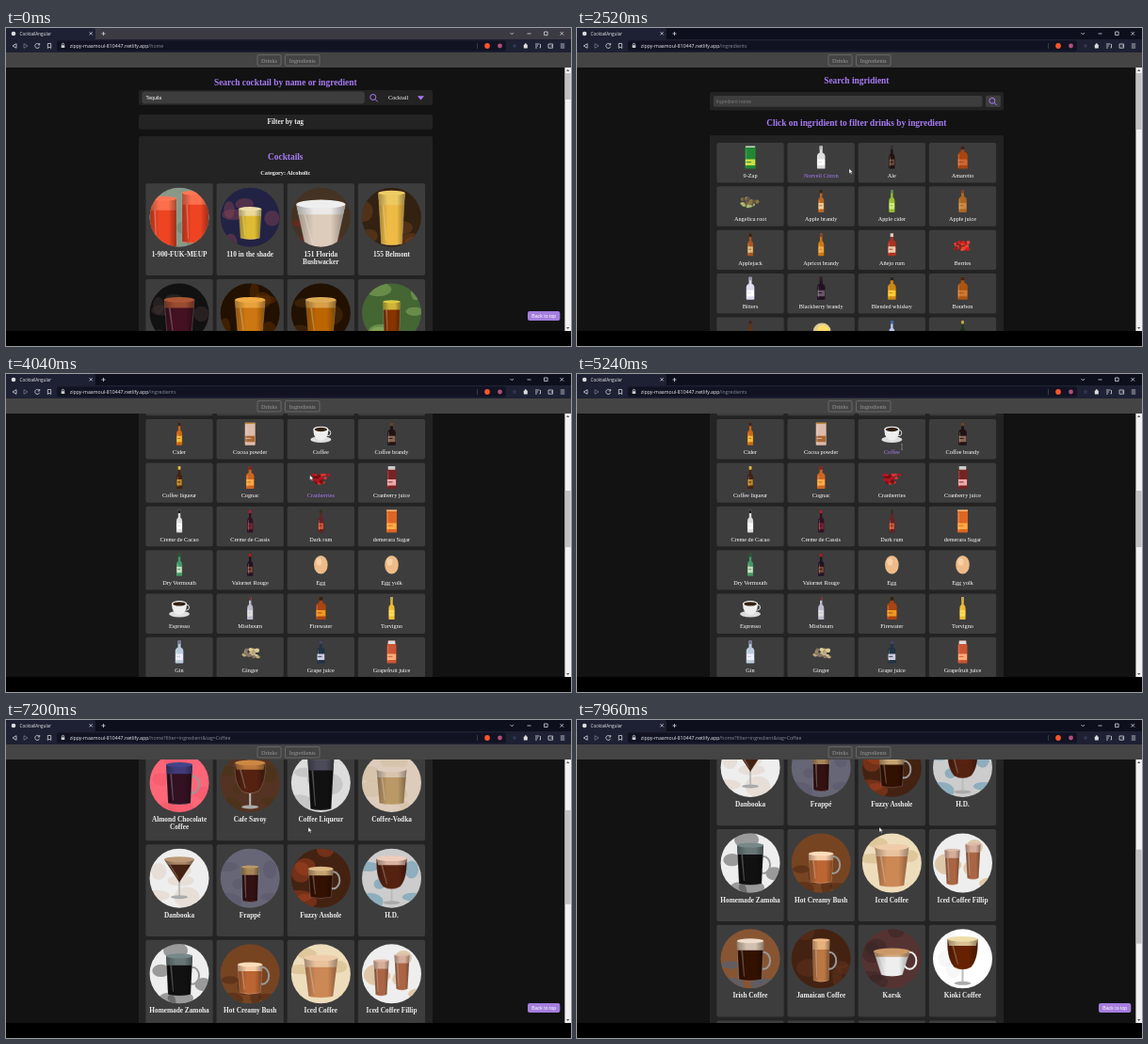
An HTML page that plays this animation: 600x338 px, repeating every 8000 ms.

```html
<!DOCTYPE html>
<html lang="en">
<head>
<meta charset="utf-8">
<title>CocktailAngular</title>
<style>
html, body { margin: 0; width: 100%; height: 100%; overflow: hidden; background: #000; }
svg { display: block; width: 600px; height: 338px; }
text { font-family: "Liberation Serif", serif; text-anchor: middle; white-space: pre; }
.bold { font-weight: bold; }
.left { text-anchor: start; }
.form { font-family: "Liberation Sans", sans-serif; }
.ui { font-family: "Open Sans", sans-serif; text-anchor: start; }
.line { fill: none; stroke: #d5d6dd; stroke-width: .8; }
.hover { fill: #a97bf5; }
</style>
</head>
<body>
<svg viewBox="0 0 600 338">
  <defs>
    <clipPath id="disc"><circle r="31.5"/></clipPath>
    <linearGradient id="round">
      <stop offset="0" stop-opacity=".3"/><stop offset=".35" stop-opacity="0"/>
      <stop offset=".7" stop-opacity="0"/><stop offset="1" stop-opacity=".35"/>
    </linearGradient>
  </defs>
  <rect width="600" height="338" fill="#121212"/>
  <g id="pages"></g>
  <g id="frame"></g>
  <g id="arrow"><path d="M0 0V5.2L1.3 4.1 2.2 6 3 5.6 2.2 3.8H3.8Z" fill="#fff" stroke="#222" stroke-width=".3"/></g>
  <g id="beam"><path d="M-1-2.8H1M0-2.8V2.8M-1 2.8H1" fill="none" stroke="#999" stroke-width=".6"/></g>
</svg>
<script>
const $ = id => document.getElementById(id);
const PURPLE = '#a97bf5', BOX = '#232323', CARD = '#3d3d3d';
const LOOP = 8000, PITCH_X = 75.15, DRINK_H = 101.7, ITEM_H = 46.35;

const rect = (x, y, w, h, fill, r = 0, more = '') =>
  `<rect x="${x}" y="${y}" width="${w}" height="${h}" rx="${r}" fill="${fill}" ${more}/>`;
const oval = (x, y, rx, ry, fill, more = '') =>
  `<ellipse cx="${x}" cy="${y}" rx="${rx}" ry="${ry}" fill="${fill}" ${more}/>`;
const path = (d, fill, more = '') => `<path d="${d}" fill="${fill}" ${more}/>`;
const line = d => `<path class="line" d="${d}"/>`;
const text = (x, y, s, size, fill = '#eee', cls = '') =>
  `<text x="${x}" y="${y}" font-size="${size}" fill="${fill}" class="${cls}">${s}</text>`;
const group = (x, y, body, more = '') => `<g transform="translate(${x} ${y})" ${more}>${body}</g>`;

function random(seed) {
  return () => (seed = (seed * 16807 + 11) % 2147483647) / 2147483647;
}

// name|backdrop accent glass drink foam
const alcoholic = `1-900-FUK-MEUP|898 676 x e42 f75
110 in the shade|224 845 s db3 eda
151 Florida Bushwacker|432 822 o dcb eee
155 Belmont|321 742 k eb4 ec6
24k nightmare|111 433 w 412 a53
252|210 630 w c71 ea4
3 Wise Men|210 531 w b60 da5
3-Mile Long Island Iced Tea|463 9b6 t 830 dc4`;
const coffee = `Almond Chocolate Coffee|f67 e56 m 312 448
Cafe Savoy|532 431 g 521 c84
Coffee Liqueur|ddd aaa k 111 556
Coffee-Vodka|dcb cb9 w b96 dcb
Danbooka|eee dcb i 421 b97
Frappé|667 556 t 311 b96
Fuzzy Asshole|421 a42 l 310 db8
H.D.|ccc 48a g 521 ecb
Homemade Zamoha|eee 333 m 111 788
Hot Creamy Bush|742 421 l b63 fdb
Iced Coffee|edb ca7 c c85 eca
Iced Coffee Fillip|eee c95 d a64 dba
Irish Coffee|853 369 m 310 edc
Jamaican Coffee|421 632 y b74 eb8
Karsk|533 322 p eee c96
Kioki Coffee|fff eee g 620 eda`;

// half widths at rim and foot, rim y, foot y, extras
const glasses = {
  t: [9, 8, -12, 24], k: [14, 11, -26, 28], w: [16, 13, -14, 22], s: [12, 10, -9, 22], o: [26, 16, -14, 32],
  c: [18, 13, -17, 24], m: [14, 12, -19, 22, 'handle'], l: [13, 11, -10, 20, 'handle'], y: [9, 8, -20, 23, 'handle'],
  p: [19, 11, -8, 17, 'handle'], g: [16, 9, -21, 9, 'stem'], i: [16, 1, -20, 3, 'stem'],
  x: [14, 14, -24, 28, '', 17], d: [8, 6, -18, 18, '', 11]
};

function glass(kind, drink, foam) {
  const [a, b, top, foot, extra, pair] = glasses[kind];
  const cut = top + (foot - top) * .24, mid = a - (a - b) * .24;
  const side = kind === 'g' ? `Q${a + 1} ${foot - 9} ${b} ${foot}Q0 ${foot + 5} ${-b} ${foot}Q${-a - 1} ${foot - 9} ${-a} ${top}`
    : `L${b} ${foot}Q0 ${foot + 3} ${-b} ${foot}`;
  const body = `M${-a} ${top}H${a}${side}Z`;
  let s = '';
  if (extra === 'stem') s += rect(-1, foot - 1, 2, 18, '#bbb') + oval(0, foot + 17, 9, 2, '#aaa');
  if (extra === 'handle') s += oval(a, 2, 7, 9, 'none', `stroke="${kind === 'p' ? '#eee' : '#999'}" stroke-width="2"`);
  s += path(body, drink, 'stroke="#fff" stroke-opacity=".3" stroke-width=".7"');
  s += path(`M${-a} ${top}H${a}L${mid} ${cut}H${-mid}Z`, foam, 'opacity=".85"');
  s += path(body, 'url(#round)') + oval(0, top, a, a * .18, foam);
  s += path(`M${-a * .7} ${cut}h1.8L${-b * .5} ${foot - 3}h-1Z`, '#fff', 'opacity=".25"');
  return pair ? group(-pair, 4, s) + group(pair, -2, s) : s;
}

function photo(x, y, style, seed) {
  const [bg, accent, kind, drink, foam] = style.split(' ').map(c => c.length > 1 ? '#' + c : c);
  const rnd = random(seed * 977 + 5);
  let s = rect(-32, -32, 64, 64, bg);
  for (let i = 0; i < 5; i++)
    s += oval(rnd() * 60 - 30, rnd() * 60 - 30, 5 + rnd() * 10, 4 + rnd() * 7, accent, 'opacity=".45"');
  return group(x, y, s + glass(kind, drink, foam), 'clip-path="url(#disc)"');
}

const magnifier = (x, y) => `<circle cx="${x - .7}" cy="${y - .7}" r="3" fill="none" stroke="${PURPLE}"/>` +
  path(`M${x + 1.5} ${y + 1.5}l2.8 2.8`, 'none', `stroke="${PURPLE}"`);

function drinkPage(list, label, query) {
  let s = text(296.8, 60.5, 'Search cocktail by name or ingredient', 9.375, PURPLE, 'bold') +
    rect(141, 66, 312, 16, BOX, 2) + rect(144.3, 67.6, 236.5, 12.8, CARD, 3) +
    text(148.6, 75.8, query || 'Enter name', 5.2, query ? '#fff' : '#777', 'left form') +
    magnifier(390.5, 74.2) + text(406, 76.2, 'Cocktail', 6.25, '#fff', 'left') + path('M437 72.2h7l-3.5 4.3Z', PURPLE) +
    rect(141, 92, 312, 15.8, BOX, 2) + text(296.8, 102.3, 'Filter by tag', 7.3, '#eee', 'bold') +
    rect(141, 115, 312, 620, BOX, 2) + text(296.8, 139.5, 'Cocktails', 9.375, PURPLE, 'bold') +
    text(296.8, 155.5, label, 6.25, '#eee', 'bold');
  const cards = list.split('\n');
  for (let i = 0; i < cards.length + 4; i++) {
    const x = 148.4 + i % 4 * PITCH_X, y = 165.2 + (i >> 2) * DRINK_H;
    s += rect(x, y, 71.3, 97.8, CARD, 2);
    if (!cards[i]) continue;
    const [name, style] = cards[i].split('|');
    s += photo(x + 35.65, y + 36, style, i + name.length);
    name.match(/.{1,18}(?= |$)/g).forEach((row, k) =>
      s += text(x + 35.65, y + 77.5 + k * 8.4, row.trim(), 7.3, '#eee', 'bold'));
  }
  return s;
}

// name|shape body cap label
const pantry = `9-Zap|c 283 ccc cd4
Norvell Citron|h ddd bbb fff
Ale|b 211 333 643
Amaretto|f a41 322 c63
Angelica root|r 874 ab7 654
Apple brandy|b b62 321 ec9
Apple cider|b 9b3 585 ce7
Apple juice|h a62 743 c84
Applejack|b a52 321 db7
Apricot brandy|b c71 842 ea4
Añejo rum|h a32 dcb eca
Berries|r c22 e43 822
Bitters|h dde 99a fff
Blackberry brandy|h 212 322 656
Blended whiskey|h c81 222 fc3
Bourbon|f a51 421 c73
Brandy|b 631 422 ca5
Cantaloupe|m ea3 dc9 fd6
Carbonated water|b bce 36a eef
Champagne|b 232 ca4 dc7
Cherry brandy|b 501 a22 723
Chocolate|x 324 536 213
Chocolate liqueur|o 321 ca3 dc7
Chocolate syrup|h 422 222 644
Cider|b c61 322 eb3
Cocoa powder|x dba b83 a63
Coffee|u eee 321 ddd
Coffee brandy|h 211 643 865
Coffee liqueur|b 421 db4 b82
Cognac|h c62 822 fa4
Cranberries|r b12 d33 711
Cranberry juice|j 722 ccc eaa
Creme de Cacao|b ddd 222 fff
Creme de Cassis|b 312 a23 723
Dark rum|b 622 332 c53
demerara Sugar|x d62 fc8 fa4
Dry Vermouth|b 496 253 cdb
Valornet Rouge|b 212 a22 743
Egg|e eb8 fdb c85
Egg yolk|e eb8 fdb c85
Espresso|u eee 321 ddd
Mistbourn|b bbc 633 ddd
Firewater|f a41 321 e92
Torvigno|b eb3 ba5 fd5
Gin|h bcd 779 eef
Ginger|r ba7 dc9 876
Grape juice|h 234 446 ccd
Grapefruit juice|j c53 ddd fa7`.split('\n');

// half widths of body and neck, shoulder depth
const bottles = { b: [3.1, 1.2, 9], h: [4.3, 1.5, 8], f: [5.3, 1.8, 7], j: [5, 3.6, 3], c: [5.6, 5, 1], x: [5.5, 5.3, 1] };

function ingredient(shape, body, cap, label, seed) {
  if (shape === 'e') return oval(0, 0, 7.3, 9.8, body) + oval(-2, -3, 3, 4, cap, 'opacity=".6"');
  if (shape === 'u') return oval(0, 6, 11, 3.4, label) + oval(7.5, -1, 3, 3, 'none', 'stroke="#ddd"') +
    path('M-8-5H8Q8 6 0 7 -8 6 -8-5Z', body) + oval(0, -5, 8, 3, '#fff') + oval(0, -4.7, 6.8, 2.2, cap);
  if (shape === 'm') return oval(1, -1, 9.3, 8.5, cap) + oval(2, -2, 6, 5.5, label) + path('M-11 0Q-5 8 10 4 3 13-6 9 -11 6-11 0Z', body);
  if (shape === 'o') return rect(-2, -12, 4, 7, cap) + oval(0, 2, 8.3, 9.5, body) + oval(0, 2, 5.8, 5.8, label) + oval(0, 2, 3.7, 3.7, body);
  if (shape === 'r') {
    const rnd = random(seed * 313 + 7), colors = [body, cap, label];
    let s = '';
    for (let i = 0; i < 22; i++)
      s += oval(rnd() * 17 - 8.5, rnd() * 9 - 3, 1.6 + rnd(), 1.3 + rnd(), colors[i % 3]);
    return s;
  }
  const [w, n, d] = bottles[shape], top = -12, s = top + d;
  return path(`M${-n} ${top}H${n}V${s - 1}Q${w} ${s} ${w} ${s + 3}V11.3Q${w} 12 ${w - .8} 12H${.8 - w}Q${-w} 12 ${-w} 11.3V${s + 3}Q${-w} ${s} ${-n} ${s - 1}Z`, body) +
    rect(-n - .2, top, 2 * n + .4, d > 2 ? 3.6 : 1.4, cap, .4) +
    rect(.4 - w, 2, 2 * w - .8, 6.5, label, .4) + rect(1 - w, 4.4, w, .9, body) +
    rect(1 - w, s + 2, .7, 8 - s, '#fff', 0, 'opacity=".3"');
}

function pantryPage() {
  let s = text(296.8, 58.5, 'Search ingridient', 9.375, PURPLE, 'bold') +
    rect(141, 68, 312, 19.6, BOX, 2) + rect(144.8, 72, 285.7, 11.8, CARD, 2) +
    text(147.6, 79.7, 'Ingredient name', 5.2, '#777', 'left form') +
    rect(434, 71.8, 16, 12.2, CARD, 2) + magnifier(441.6, 78) +
    text(296.8, 104.3, 'Click on ingridient to filter drinks by ingredient', 9.375, PURPLE, 'bold') +
    rect(141, 114, 312, 700, BOX, 2);
  pantry.forEach((entry, i) => {
    const [name, spec] = entry.split('|');
    const [shape, ...colors] = spec.split(' ');
    const x = 148.4 + i % 4 * PITCH_X, y = 122 + (i >> 2) * ITEM_H;
    s += rect(x, y, 71.3, 42.4, CARD, 2) +
      group(x + 35.65, y + 15.6, ingredient(shape, ...colors.map(c => '#' + c), i)) +
      text(x + 35.65, y + 36.9, name, 6.25, '#fff', 'item');
  });
  return s;
}

const navButton = (x, w, label) =>
  rect(x, 28.6, w, 11.4, 'none', 1, 'stroke="#777" stroke-width=".7"') + text(x + w / 2, 36.5, label, 6.25, '#999');

function browser() {
  return rect(0, 0, 600, 12.5, '#0d0f1c', 0, 'id="strip"') + rect(0, 0, 95, 12.5, '#1e2133', 2) + rect(0, 12, 600, 14, '#1e2133') +
    rect(54, 13.4, 477, 11, '#111322', 2) + oval(8, 6, 2.3, 2.3, '#ddd') +
    text(14.6, 7.8, 'CocktailAngular', 4.6, '#eee', 'ui') +
    line('M88.6 4.2l3.2 3.2m0-3.2l-3.2 3.2M101.5 6h4M103.5 4v4') +
    line('M535.5 5l1.8 1.8 1.8-1.8M553.5 6h4M571.5 4h3.6v3.6h-3.6ZM588.5 4l3.6 3.6m0-3.6l-3.6 3.6') +
    line('M11 16.7v4.6L7 19Z') + `<g opacity=".45">${line('M19 16.7v4.6l4-2.3Z')}</g>` +
    line('M35.3 17.5a2.5 2.5 0 1 0 .3 2.3M35.7 16v2h-2M44.3 16.5h3.4v5l-1.7-1.3-1.7 1.3Z') +
    rect(58.7, 18.3, 3.6, 2.8, '#ccc', .4) + line('M59.4 18.4v-1a1.1 1.1 0 0 1 2.2 0v1') +
    `<text class="ui" x="67.8" y="20.9" font-size="5.2" fill="#eee">zippy-maamoul-810447.netlify.app<tspan id="path" fill="#888b99"></tspan></text>` +
    rect(500, 16, .6, 6, '#555') + oval(511, 19, 2.9, 2.9, '#fb542b') + oval(524.5, 19, 2.4, 2.4, '#b0507c') +
    oval(540, 19, 2, 2, '#30344e') + rect(549.8, 17.6, 4, 4, '#ddd', .6) + oval(551.8, 17.3, 1, 1, '#ddd') +
    line('M562 17h4.5M562 19h3M562 21h2M567.5 17v4h-1M576 17h4.6v4.2h-4.6ZM578.5 19h2') + line('M588.8 17h4.4M588.8 19h4.4M588.8 21h4.4') +
    rect(0, 26, 600, 16, '#444') + navButton(267, 25, 'Drinks') +
    `<g id="link">${navButton(296.5, 36.5, 'Ingredients')}</g>` +
    rect(593.4, 42, 6.6, 280, '#f1f1f1') + path('M595 46l1.7-2 1.7 2ZM595 318l1.7 2 1.7-2Z', '#555') +
    rect(593.8, 48, 5.8, 28, '#c1c1c1', 0, 'id="thumb"') +
    `<g id="top">${rect(554, 301, 34.3, 10, '#a47ddd', 2)}${text(571.2, 307.9, 'Back to top', 5.2, '#fff', 'form')}</g>` +
    rect(0, 322, 600, 16, '#000');
}

const pages = [
  drinkPage(alcoholic, 'Category: Alcoholic', 'Tequila'),
  pantryPage(),
  drinkPage(coffee, 'Ingredient: Coffee')
];
$('pages').innerHTML = pages.map(p => `<g>${p}</g>`).join('');
$('frame').innerHTML = browser();
const views = [...$('pages').children], items = [...document.querySelectorAll('.item')];

// start, path, thumb length, thumb travel per scrolled pixel
const scenes = [
  [0, '/home', 28, .1],
  [920, '/ingredients', 60, .216],
  [5280, '/home?filter=ingredient&tag=Coffee', 100, .355]
];
const scrollKeys = [[0, 0], [2560, 0], [3320, 195.5], [3920, 352], [5279, 352], [5280, 0],
  [6770, 0], [7200, 134.5], [7680, 252.5]];
const cursorKeys = [[2200, 314, 34], [2480, 289, 149.5], [2600, 289, 149.5], [3300, 288.5, 153.5],
  [3920, 288.5, 153.5], [4120, 345, 77.5], [5900, 345, 77.5], [6200, 321, 114]];

function sample(keys, t, col = 1) {
  const i = keys.findIndex(k => k[0] > t);
  if (i < 0) return keys[keys.length - 1][col];
  if (!i) return keys[0][col];
  const a = keys[i - 1], b = keys[i];
  return a[col] + (b[col] - a[col]) * (t - a[0]) / (b[0] - a[0]);
}

const show = (el, on) => el.style.display = on ? '' : 'none';

function draw(t) {
  const n = scenes.findLastIndex(s => s[0] <= t), [, url, length, rate] = scenes[n];
  const scroll = sample(scrollKeys, t), x = sample(cursorKeys, t), y = sample(cursorKeys, t, 2);
  views.forEach((v, i) => show(v, i === n));
  views[n].setAttribute('transform', `translate(0 ${-scroll})`);
  $('path').textContent = url;
  $('thumb').setAttribute('y', 48 + scroll * rate);
  $('thumb').setAttribute('height', length);
  show($('top'), n !== 1);

  // the window gains focus with the first click
  $('strip').setAttribute('fill', n ? '#0d0f1c' : '#3c3b44');
  $('link').style.filter = n && y < 42 ? 'brightness(1.3)' : '';

  const still = scroll === sample(scrollKeys, t - 40);
  const col = Math.floor((x - 148.4) / PITCH_X), down = y + scroll - 122, row = Math.floor(down / ITEM_H);
  const over = still && y > 42 && down - row * ITEM_H < 42.4 ? row * 4 + col : -1;
  items.forEach((el, i) => el.classList.toggle('hover', i === over));

  const beam = t >= 4120 && n === 1;
  show($('beam'), beam);
  show($('arrow'), !beam && n > 0);
  for (const id of ['arrow', 'beam']) $(id).setAttribute('transform', `translate(${x} ${y})`);
}

const start = performance.now();
function tick() {
  draw((performance.now() - start) % LOOP);
  requestAnimationFrame(tick);
}
tick();
</script>
</body>
</html>
```
